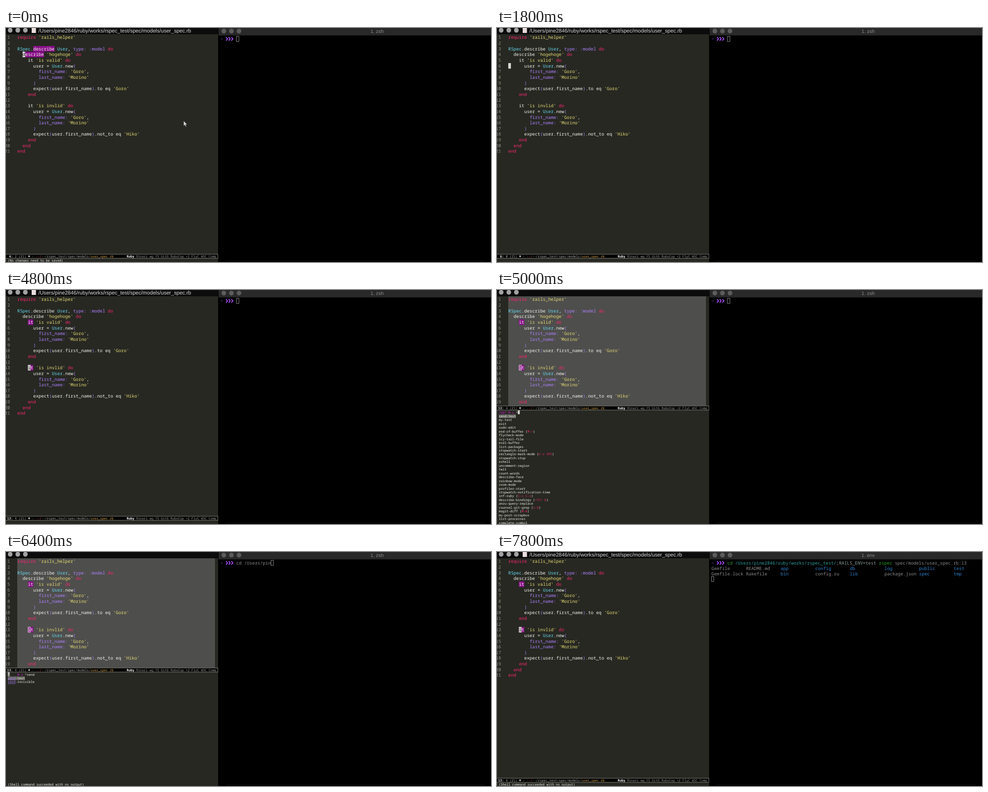
Write an HTML page that moves like this. It is 1077 px wide and 520 px high and loops after 8 s.

```html
<!DOCTYPE html>
<html lang="en">
<head>
<meta charset="utf-8">
<title>Running a spec from the editor</title>
<style>
  html, body { margin: 0; width: 100%; height: 100%; overflow: hidden; background: #000; }
  svg { display: block; width: 1077px; height: 520px; }
  text { white-space: pre; text-rendering: geometricPrecision; }
  .mono { font: 9.86px "Noto Sans Mono", "DejaVu Sans Mono", monospace; }
  .tiny { font: 7.05px "Noto Sans Mono", "DejaVu Sans Mono", monospace; }
  .title { font: 11.6px "Liberation Sans", Arial, sans-serif; }
  .tab { font-size: 10.8px; text-anchor: middle; }
  .num { text-anchor: end; }
  .bold { font-weight: 700; }
  .match { text-decoration: underline; }
</style>
</head>
<body>
<svg id="stage" viewBox="0 0 1077 520"></svg>
<script>
const LOOP = 8000;
const CW = 5.915, LH = 12.65;    // code cell
const SW = 4.23, SH = 8.45;      // small cell
const BG = '#272822', FG = '#f4f4ee', PINK = '#f92672', YELLOW = '#e6db74',
      CYAN = '#66d9ef', PURPLE = '#ae81ff', MARK = '#8b0f8b', BLOCK = '#d8d8d4',
      GREY = '#8f908a', TERM = '#8c8c8c', GREEN = '#27a327', TEAL = '#2fa39f', BLUE = '#2b84cf';

const HOME = '/Users/pine2846/ruby/works/rspec_test/';
const CODE = `require 'rails_helper'

RSpec.describe User, type: :model do
  describe 'hogehoge' do
    it 'is valid' do
      user = User.new(
        first_name: 'Kenji',
        last_name: 'Morino'
      )
      expect(user.first_name).to eq 'Kenji'
    end

    it 'is invlid' do
      user = User.new(
        first_name: 'Kenji',
        last_name: 'Morino'
      )
      expect(user.first_name).not_to eq 'Hiko'
    end
  end
end`.replaceAll('Kenji', 'Goro').split('\n');

const COMMANDS = `send-text
my-test
exit
sudo-edit
end-of-buffer (M->)
flycheck-mode
icy-tail-file
eval-buffer
list-packages
stopwatch-start
rectangle-mark-mode (C-x SPC)
stopwatch-stop
eshell
uncomment-region
twit
count-words
describe-face
rainbow-mode
zoom-mode
profiler-start
stopwatch-notification-time
inf-ruby (C-c C-s)
describe-bindings (<f1> b)
anzu-query-replace
counsel-git-grep (s-O)
magit-diff (M-m)
my-post-scrapbox
list-processes
complete-symbol`.split('\n');

const FILES = [
  ['Gemfile', 'README.md', 'app/', 'config/', 'db/', 'log/', 'public/', 'test/'],
  ['Gemfile.lock', 'Rakefile', 'bin/', 'config.ru', 'lib/', 'package.json', 'spec/', 'tmp/']
];

// Each step changes part of the state from its time on.
const STEPS = [
  [0, { line: 4, col: 2, mark: 'describe', echo: '(No changes need to be saved)',
        mouse: true, query: null, point: 0, cmd: 'none', tab: 'zsh' }],
  [400, { mark: '', echo: '', mouse: false }],
  [600, { col: 0 }],
  [1000, { line: 5 }],
  [1400, { line: 6 }],
  [2000, { line: 7 }],
  [2200, { line: 8 }],
  [2400, { line: 9 }],
  [2600, { line: 10 }],
  [2800, { line: 11 }],
  [3000, { line: 12 }],
  [3200, { line: 13 }],
  [3800, { col: 1 }],
  [4000, { col: 2 }],
  [4200, { col: 3 }],
  [4400, { col: 4 }],
  [4600, { mark: 'it' }],
  [5000, { query: '', point: 10 }],
  [5400, { query: 's', point: 11 }],
  [5600, { query: 'se', point: 12 }],
  [5800, { query: 'sen', point: 13 }],
  [6000, { query: 'send', point: 14 }],
  [6400, { point: 0, cmd: 'part', echo: '(Shell command succeeded with no output)' }],
  [6600, { query: null, cmd: 'full' }],
  [7000, { cmd: 'run', tab: 'env' }]
];

const esc = s => s.replace(/&/g, '&amp;').replace(/</g, '&lt;').replace(/>/g, '&gt;');
const span = (s, fill, cls = '') => `<tspan fill="${fill}" class="${cls}">${esc(s)}</tspan>`;
const text = (x, y, body, cls = 'mono') => `<text x="${x}" y="${y}" class="${cls}">${body}</text>`;
const rect = (x, y, w, h, fill, more = '') =>
  `<rect x="${x}" y="${y}" width="${w}" height="${h}" fill="${fill}" ${more}/>`;
const frame = (x, y, w, h, color) => rect(x, y, w, h, 'none', `stroke="${color}"`);
const dot = (x, y, r, fill) => `<circle cx="${x}" cy="${y}" r="${r}" fill="${fill}"/>`;

const colX = c => 25 + c * CW;
const rowTop = n => 14.7 + (n - 1) * LH;
const baseline = n => 24.4 + (n - 1) * LH;

function paint(line) {
  const token = /('[^']*')|\b(do|end|require)\b|(\w+:(?= )|:\w+|[()])|([A-Z]\w*)|\w+|\W/g;
  return [...line.matchAll(token)].map(([s, str, key, sym, name]) =>
    span(s, str ? YELLOW : key ? PINK : sym ? PURPLE : name ? CYAN : FG)).join('');
}

const LINES = CODE.map((line, i) =>
  text(9, baseline(i + 1), span(String(i + 1), GREY), 'mono num') +
  text(25, baseline(i + 1), paint(line))).join('');

function marks(word) {
  if (!word) return '';
  const find = new RegExp(`\\b${word}\\b`);
  return CODE.map((line, i) => {
    const c = line.search(find);
    return c < 0 ? '' : rect(colX(c), rowTop(i + 1), word.length * CW, 12.3, MARK);
  }).join('');
}

function modeLine(y, s) {
  const x = c => 2.5 + c * SW, b = y + 2.6;
  return rect(-1, y - 4.5, 471.5, 9, '#000', 'stroke="#85857f"') +
    text(x(0), b, span(String(s.line).padStart(2) + ':', FG, 'bold') +
      span(` ${s.col} (21)`, '#b4b4ae'), 'tiny') +
    dot(51.3, y, 2, '#b4b4ae') +
    text(x(13), b, span('-', '#b4b4ae'), 'tiny') +
    text(x(15), b, span('--/', '#e0604a'), 'tiny') +
    [80.4, 82.9, 85.4].map(cx => dot(cx, y, 0.5, '#b4b4ae')).join('') +
    text(86.6, b, span('/rspec_test/spec/models/', '#b4b4ae') + span('user_spec.rb', '#e5ae4c'), 'tiny') +
    text(268, b, span('Ruby', '#fff', 'bold') +
      span(' Rinari wg YS GitG RuboCop +2 FlyC WSC Comp', '#a3a39d'), 'tiny');
}

function command(name, size) {
  const [, main, keys] = name.match(/^(\S+)(?: \((.*)\))?$/);
  return (size ? span(main.slice(0, size), PURPLE, 'match') : '') + span(main.slice(size), FG) +
    (keys ? span(' (', FG) + span(keys, PINK) + span(')', FG) : '');
}

function miniBuffer(s) {
  const q = s.query;
  const list = q ? [...COMMANDS, 'send-invisible'].filter(c => c.startsWith(q)) : COMMANDS;
  const count = q ? String(list.length) : '7267';
  const y = i => 274.5 + i * SH;
  let out = rect(0, 257, 471, 263, BG) + modeLine(262.3, s) +
    text(4, y(0), span(count.padEnd(5) + 'M-x ', '#d01fd0') + span('^' + q, FG), 'tiny') +
    rect(4 + s.point * SW, 267.6, SW, 8.4, BLOCK) +
    (s.point ? '' : text(4, y(0), span(count[0], '#111'), 'tiny')) +
    rect(4, 276.4, 9 * SW, 8.3, '#62625d');
  list.forEach((c, i) => { out += text(4, y(i + 1), command(c, q.length), 'tiny'); });
  return out;
}

function editor(s) {
  const open = s.query !== null;
  const x = colX(s.col), y = rowTop(s.line);
  const under = CODE[s.line - 1][s.col] || ' ';
  return rect(0, 0, 471, 520, BG) + rect(0, 0, 471, 14, '#0c0c0c') +
    [9.3, 26.2, 43].map(cx => dot(cx, 5, 5.2, '#a2a2a4')).join('') +
    (open ? rect(25, 14, 439, 244, '#4e4e4c') :
      rect(57, 0, 9.5, 11, '#e9dcdc') +
      text(72, 9.6, span(HOME + 'spec/models/user_spec.rb', '#dcdcdc'), 'title')) +
    marks(s.mark) + LINES +
    (open ? frame(x + 0.5, y + 0.5, CW - 1, 11.3, '#f0f0ee') :
      rect(x, y, CW, 12.3, BLOCK) + text(x, baseline(s.line), span(under, '#222'))) +
    (open ? miniBuffer(s) : modeLine(507.3, s)) +
    text(4, 519.1, span(s.echo, FG), 'tiny') +
    (s.mouse ? '<path d="M394.5 206.5v11l2.5-2.3 1.8 4 1.8-.8-1.7-3.9h3.3z" fill="#d8d8d8" stroke="#333" stroke-width=".6"/>' : '');
}

function terminal(s) {
  const x0 = 476, start = 511.3, y = i => 28 + i * 12;
  const full = s.cmd === 'full' || s.cmd === 'run';
  const typed = s.cmd === 'none' ? [] :
    !full ? [['cd ' + HOME.slice(0, 10), TERM]] :
    [['cd ', GREEN], [HOME, TEAL], [';RAILS_ENV=test ', '#8fa09f'], ['rspec', GREEN],
     [' spec/models/user_spec.rb:13', TERM]];
  const size = typed.reduce((n, [t]) => n + t.length, 0);
  let out = rect(471, 0, 606, 520, '#000') + rect(472, 0, 605, 16.5, '#292929') +
    [483.7, 500.6, 517.4].map(cx => dot(cx, 6.7, 5.2, '#5c5c5c')).join('') +
    text(824, 10.8, span('1. ' + s.tab, '#8e8e8e'), 'title tab') +
    rect(487, 517, 576, 1, '#151515') +
    text(x0, y(0), span('~', '#8a55d8'));
  for (let i = 0; i < 3; i++)
    out += `<path d="M${488.6 + i * CW} 20.4l3.3 3.8-3.3 3.8" fill="none" stroke="#a44df0" stroke-width="2"/>`;
  out += text(start, y(0), typed.map(([t, c]) => span(t, c)).join(''));
  if (s.cmd === 'run') {
    FILES.forEach((row, r) => row.forEach((f, c) => {
      out += text(x0 + c * 13 * CW, y(r + 1), span(f.replace('/', ''), f.endsWith('/') ? BLUE : TERM));
    }));
    return out + frame(x0 + 0.5, 54.5, 5, 11, '#8a8a8a');
  }
  return out + frame(start + size * CW + 0.3, 18.5, 5.6, 11.5, '#8a8a8a');
}

const stage = document.getElementById('stage');
let shown = 0;

function draw(t) {
  const past = STEPS.filter(([at]) => at <= t);
  if (past.length === shown) return;
  shown = past.length;
  const state = Object.assign({}, ...past.map(([, change]) => change));
  stage.innerHTML = editor(state) + terminal(state);
}

const begin = performance.now();
function tick() {
  draw((performance.now() - begin) % LOOP);
  requestAnimationFrame(tick);
}
tick();
</script>
</body>
</html>
```
